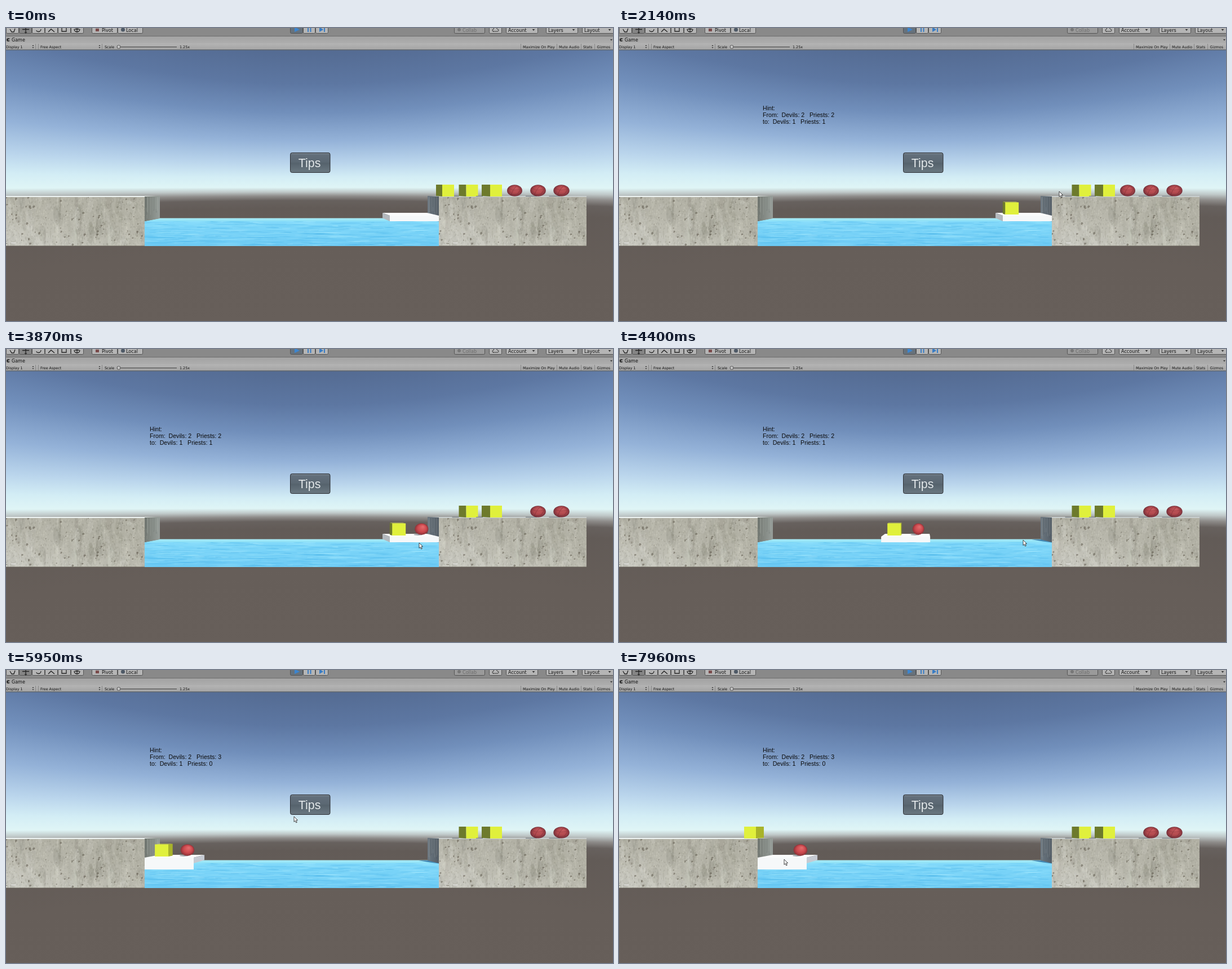
Write an HTML page with a canvas that moves like this. It is 1077 px wide and 520 px high and loops after 8000 ms.

```html
<!DOCTYPE html>
<html lang="en">
<head>
<meta charset="utf-8">
<title>River crossing</title>
<style>
html, body { margin: 0; width: 100%; height: 100%; overflow: hidden; background: #655e5a; }
canvas { display: block; }
</style>
</head>
<body>
<canvas id="stage" width="1077" height="520"></canvas>
<script>
const W = 1077, H = 520, LOOP = 8000;
const STEP = 77.3, PHASE = 37.5;  // the picture is refreshed about 13 times a second
const EYE = { x: 540, y: 280 };   // vanishing point of the scene
const SPEED = 0.83;               // pixels per ms for boat and crew
const ctx = document.getElementById('stage').getContext('2d');

let seed = 7;
const rnd = (a = 0, b = 1) => {
  seed = (seed * 16807) % 2147483647;
  return a + (b - a) * seed / 2147483647;
};
const lerp = (a, b, p) => a + (b - a) * p;
const clamp = p => Math.max(0, Math.min(1, p));

function layer(w, h, paint) {
  const c = document.createElement('canvas');
  c.width = w; c.height = h;
  paint(c.getContext('2d'));
  return c;
}
function gradient(g, x0, y0, x1, y1, stops) {
  const fill = g.createLinearGradient(x0, y0, x1, y1);
  stops.forEach(([p, color]) => fill.addColorStop(p, color));
  return fill;
}
function rect(g, x, y, w, h, color) {
  g.fillStyle = color;
  g.fillRect(x, y, w, h);
}
function poly(g, points, color) {
  g.fillStyle = color;
  g.beginPath();
  points.forEach(p => g.lineTo(...p));
  g.closePath();
  g.fill();
}
function ellipse(g, x, y, rx, ry, color) {
  g.fillStyle = color;
  g.beginPath();
  g.ellipse(x, y, rx, ry, 0, 0, 7);
  g.fill();
}
function text(g, str, x, y, size, color = '#111', font = '"DejaVu Sans", sans-serif') {
  g.font = `${size}px ${font}`;
  g.fillStyle = color;
  g.fillText(str, x, y);
}
const ARIAL = '"Liberation Sans", Arial, sans-serif';

// ---- static scenery -------------------------------------------------

function paintSky(g) {
  const stops = [[-240, '#546b92'], [-180, '#5d77a2'], [-130, '#718fbb'], [-80, '#94b2d8'],
    [-40, '#bad5ec'], [-15, '#d3edf5'], [3, '#dff5f6'], [11, '#bfc8c8'], [18, '#8f8d8b'],
    [26, '#67615e'], [40, '#625b57'], [110, '#665e59'], [240, '#675f5a']];
  const fill = gradient(g, 0, -240, 0, 240, stops.map(([y, c]) => [(y + 240) / 480, c]));
  for (let x = 0; x < W; x++) {
    const stretch = Math.hypot(1, (x - EYE.x) / 520);
    g.setTransform(1, 0, 0, stretch, 0, EYE.y);
    rect(g, x, -260, 1, 520, fill);
  }
  g.resetTransform();
}

const concrete = layer(262, 87, g => {
  rect(g, 0, 0, 262, 87, gradient(g, 60, 0, 40, 87, [[0, '#b2b1a5'], [0.5, '#bcbbb0'], [1, '#c9c9c1']]));
  for (let i = 0; i < 150; i++) {
    const tone = rnd() < 0.55 ? '225,226,216' : '125,124,112';
    ellipse(g, rnd(0, 262), rnd(0, 87), rnd(1, 7), rnd(4, 22), `rgba(${tone},${rnd(0.05, 0.2)})`);
  }
  for (let i = 0; i < 1600; i++) {
    const tone = rnd() < 0.5 ? '235,234,224' : '105,102,90';
    rect(g, rnd(0, 262), rnd(0, 87), rnd(1, 2.5), rnd(1, 4), `rgba(${tone},.13)`);
  }
  for (let i = 0; i < 90; i++) {
    const x = rnd(0, 262), y = rnd(0, 87), r = rnd(0.6, 2);
    ellipse(g, x, y, r, r * rnd(0.8, 1.3), 'rgba(85,80,68,.5)');
    ellipse(g, x + r * 0.7, y + r, r * 0.6, r * 0.5, 'rgba(225,222,208,.5)');
  }
  rect(g, 25, 81, 8, 1, '#eee');
});

function paintBank(g, x, edge, backEdge, sideColors, topColor) {
  poly(g, [[x, 300], [x + 262, 300], [Math.max(x + 262, backEdge), 298], [Math.min(x, backEdge), 298]], topColor);
  poly(g, [[edge, 299], [backEdge, 298], [backEdge, 338], [edge, 343]],
    gradient(g, edge, 0, backEdge, 0, sideColors.map((c, i) => [i, c])));
  for (let i = 0; i < 12; i++) {
    const sx = lerp(edge, backEdge, rnd(0.05, 0.95));
    rect(g, sx, 300, 1, rnd(18, 38), `rgba(${rnd() < 0.5 ? '200,205,200' : '50,55,58'},.18)`);
  }
  g.drawImage(concrete, x, 300);
  rect(g, x, 386, 262, 1, 'rgba(90,85,75,.5)');
}

function paintWater(g) {
  poly(g, [[273, 337.5], [748, 337.5], [768, 343], [246, 343]],
    gradient(g, 0, 337, 0, 343, [[0, '#aeeef6'], [1, '#8be0f8']]));
  g.save();
  g.beginPath();
  g.rect(246, 343, 522, 44);
  g.clip();
  rect(g, 246, 343, 522, 44, gradient(g, 0, 343, 0, 387, [[0, '#82d9fa'], [0.5, '#76d1f7'], [1, '#6ccaf4']]));
  for (let i = 0; i < 480; i++) {
    const tone = rnd() < 0.55 ? '175,238,254' : '60,170,225';
    ellipse(g, rnd(246, 768), rnd(343, 387), rnd(5, 28), rnd(0.4, 1.1), `rgba(${tone},${rnd(0.08, 0.3)})`);
  }
  g.restore();
  poly(g, [[732, 338], [768, 338], [768, 343.5], [752, 341.5]], '#4187b4');
}

function button(g, x, w, label, labelX, color = '#111', fill = '#b5b5b5') {
  g.beginPath();
  g.roundRect(x + 0.5, -6, w - 1, 15.5, 2);
  g.fillStyle = fill;
  g.fill();
  g.strokeStyle = '#555';
  g.lineWidth = 1;
  g.stroke();
  if (label) text(g, label, labelX, 6.5, 8.1, color);
}
function arrows(g, x, y, size, down = true) {
  const s = down ? 1 : -1;
  poly(g, [[x - size, y], [x + size, y], [x, y + s * size * 1.3]], '#333');
}
function paintToolbars(g) {
  rect(g, 0, 0, W, 14, '#898989');
  rect(g, 0, 14, W, 1, '#6f6f6f');
  rect(g, 0, 15, W, 12, gradient(g, 0, 15, 0, 27, [[0, '#a3a3a3'], [1, '#adadad']]));
  rect(g, 0, 27, W, 11, gradient(g, 0, 27, 0, 38, [[0, '#b4b4b4'], [1, '#a5a5a5']]));
  rect(g, 0, 38, W, 1.5, '#646a70');

  for (let i = 0; i < 6; i++) button(g, i * 23, 23, '', 0, '', i === 1 ? '#858585' : '#b5b5b5');
  g.strokeStyle = '#222';
  g.lineWidth = 1.3;
  g.beginPath();
  g.moveTo(7, 2); g.lineTo(10, 7); g.lineTo(14, 7); g.lineTo(16, 1);
  g.moveTo(29, 2.5); g.lineTo(41, 2.5); g.moveTo(35, 0); g.lineTo(35, 8);
  g.moveTo(62, 2); g.arc(57.5, 2, 4.5, 0, 2.6);
  g.moveTo(75, 7); g.lineTo(80, 2); g.lineTo(86, 7);
  g.rect(99, -2, 8, 8);
  g.moveTo(131, 2); g.arc(126, 2, 5, 0, 3.14);
  g.moveTo(126, -1); g.lineTo(126, 7); g.moveTo(122, 2); g.lineTo(130, 2);
  g.stroke();
  arrows(g, 35, 7, 2.5);

  button(g, 152, 46, 'Pivot', 170);
  button(g, 198, 45, 'Local', 213);
  rect(g, 159, 1, 6, 5, '#7a4a4a');
  ellipse(g, 207.5, 3, 3.5, 3.5, '#4e5966');

  button(g, 504, 23, '', 0, '', '#67727c');
  button(g, 527, 22, '', 0);
  button(g, 549, 23, '', 0);
  poly(g, [[512, -2], [521, 3], [512, 7]], '#3c85cf');
  [[535, 2], [539.5, 2], [564, 2]].forEach(([x, w]) => rect(g, x, 0, w, 7, '#397cc4'));
  poly(g, [[556, -2], [563, 3], [556, 7]], '#397cc4');

  button(g, 795, 55, 'Collab', 810, '#6b6b6b', '#9a9a9a');
  ellipse(g, 804, 3, 3, 3, '#777');
  button(g, 857, 23, '', 0);
  g.beginPath();
  g.moveTo(864, 6); g.arc(865, 4, 2, 1.6, 4.8); g.arc(868, 2, 3, 3.4, 6); g.arc(872, 4, 2, 4.7, 7.8);
  g.closePath();
  g.strokeStyle = '#333';
  g.stroke();
  [[887, 57, 'Account', 891], [958, 57, 'Layers', 962], [1022, 60, 'Layout', 1026]].forEach(b => button(g, ...b));
  [936, 1007, 1071].forEach(x => arrows(g, x, 2, 2.3));

  ellipse(g, 4, 21, 3, 3, '#333');
  rect(g, 4, 20, 4, 2, '#aaa');
  text(g, 'Game', 10, 24, 8);
  arrows(g, 1074, 20, 2);
  [[0, 'Display 1'], [61, 'Free Aspect'], [175, 'Scale'], [308, '1.25x'], [917, 'Maximize On Play'],
    [981, 'Mute Audio'], [1024, 'Stats'], [1048.5, 'Gizmos']].forEach(([x, s]) => text(g, s, x, 35.5, 6.4));
  [52, 57, 170, 913, 977, 1020, 1044].forEach(x => rect(g, x, 28, 1, 10, '#888'));
  [48, 166].forEach(x => { arrows(g, x, 32, 1.5, false); arrows(g, x, 34, 1.5); });
  rect(g, 203, 33, 100, 1.3, '#555');
  ellipse(g, 200, 33.5, 3.3, 3.3, '#555');
  ellipse(g, 200, 33.5, 2.4, 2.4, '#c4c4c4');
}

const scenery = layer(W, H, g => {
  paintSky(g);
  paintWater(g);
  paintBank(g, -16, 246, 273, ['#747973', '#979e9a'], '#eef4f3');
  paintBank(g, 768, 768, 748, ['#545e67', '#6c7780'], '#c9cfcf');
  paintToolbars(g);
});

// ---- moving parts ---------------------------------------------------

const recede = (x, y, k) => [lerp(x, EYE.x, k), lerp(y, EYE.y, k)];

function drawBox(x, y, w, h, k, colors) {
  const r = x + w, b = y + h;
  if (y > EYE.y) poly(ctx, [[x, y], [r, y], recede(r, y, k), recede(x, y, k)], colors.top);
  const left = x > EYE.x, edge = left ? x : r;
  if (left || r < EYE.x)
    poly(ctx, [[edge, y], recede(edge, y, k), recede(edge, b, k), [edge, b]], left ? colors.left : colors.right);
  rect(ctx, x, y, w, h, colors.front);
}

const CUBE = { front: '#e0f03c', left: '#6d7a2c', right: '#a8b32a', top: '#dbe85c' };
const BOAT = { front: '#f6f8f9', left: '#b3b8bd', right: '#c6cad2', top: '#fbfcfc' };

// p = 0 on a bank, p = 1 on the boat
function drawCube(x, y, p) {
  drawBox(x, y, lerp(21, 24, p), lerp(21, 21.5, p), lerp(0.047, 0.03, p), CUBE);
}
function drawBall(x, y) {
  const rx = 10.4 + Math.abs(x - EYE.x) * 0.0085, ry = 10.3;
  const onBank = y < 300;
  ctx.save();
  ctx.translate(x, y);
  ctx.scale(rx / ry, 1);
  const fill = ctx.createRadialGradient(2, -4, 1, 0, 0, ry);
  fill.addColorStop(0, onBank ? '#c4585c' : '#e2686a');
  fill.addColorStop(0.6, onBank ? '#ae474c' : '#cb484d');
  fill.addColorStop(1, onBank ? '#73303a' : '#8a3238');
  ellipse(ctx, 0, 0, ry, ry, fill);
  if (onBank) {
    ctx.strokeStyle = 'rgba(80,25,32,.28)';
    ctx.lineWidth = 0.8;
    ctx.beginPath();
    [[-9, -4], [-2, -1], [3, -9], [8, -2], [-2, -1], [-5, 8], [4, 6], [8, -2]].forEach(p => ctx.lineTo(...p));
    ctx.stroke();
  }
  ctx.restore();
}

const boatX = t => lerp(681, 246, clamp((t - 4146) * SPEED / 435));
const cubeSeat = t => 26 + 0.968 * boatX(t);
const ballSeat = t => 87 + 0.955 * boatX(t);

// across first, then down
function board(t, start, x0, y0, x1, y1) {
  const run = Math.max(0, t - start) * SPEED, across = x0 - x1;
  return { x: x0 - Math.min(run, across), y: y0 + Math.max(0, Math.min(run - across, y1 - y0)) };
}

function drawBoat(t) {
  const x = boatX(t), docked = x < 250;
  drawBox(x, 333, 87, 10, 0.092, BOAT);
  if (docked) rect(ctx, x, 333, 87, 21, BOAT.front);
}

function drawCrew(t) {
  [816.5, 859].forEach(x => {
    rect(ctx, x - 25, 298, 12, 1, '#70767a');
    drawCube(x, 278, 0);
  });
  [944, 985.5].forEach(x => {
    rect(ctx, x - 22, 298, 20, 1, '#70767a');
    drawBall(x, 288.5);
  });

  const leave = 7255;
  if (t < leave) {
    const c = board(t, 1970, 774, 278, cubeSeat(0), 309.5);
    drawCube(t > 4000 ? cubeSeat(t) : c.x, c.y, clamp((774 - c.x) / 87));
  } else {
    // up first, then across
    const run = (t - leave) * SPEED, rise = Math.min(run, 31.5);
    const p = clamp((run - rise) / 42);
    drawCube(lerp(264, 222, p), 309.5 - rise, 1 - p);
  }

  const ball = board(t, 2975, 902.5, 288.5, ballSeat(0), 319.5);
  if (t > 4000) ball.x = ballSeat(t);
  if (ball.y > 315) ellipse(ctx, ball.x - 6, 329.5, 8, 1.2, 'rgba(70,75,85,.6)');
  drawBall(ball.x, ball.y);
}

// time, x, y of the pointer tip
const PATH = [
  [77, 700, 441], [386, 611, 299], [464, 611, 299], [930, 562, 247], [1237, 557, 245],
  [1314, 584, 254], [1778, 774, 290], [2100, 774, 290], [2783, 896, 286],
  [2860, 907, 284], [3324, 907, 284], [3700, 775, 358], [3942, 717, 339], [4640, 717, 339],
  [4947, 400, 330], [5102, 308, 319], [5180, 310, 318], [5700, 538, 241], [5875, 535, 245],
  [5952, 511, 260], [6648, 317, 322], [6725, 317, 322], [7112, 286, 318], [7576, 286, 318], [7962, 293, 336]
];
function pointerAt(t) {
  const i = PATH.findIndex(p => p[0] > t + 1);
  if (i === 0) return null;
  if (i < 0) return PATH[PATH.length - 1].slice(1);
  const a = PATH[i - 1], b = PATH[i], p = clamp((t - a[0]) / (b[0] - a[0]));
  const eased = lerp(p, p * p * (3 - 2 * p), 0.5);
  return [lerp(a[1], b[1], eased), lerp(a[2], b[2], eased)];
}
function drawPointer([x, y]) {
  ctx.save();
  ctx.translate(Math.round(x) + 0.5, Math.round(y) + 0.5);
  ctx.lineJoin = 'round';
  poly(ctx, [[-0.5, -0.5], [-0.5, 9], [1.6, 7], [3.2, 10.5], [4.8, 9.8], [3.3, 6.3], [6, 6]], '#fff');
  ctx.strokeStyle = '#1a1a1a';
  ctx.lineWidth = 0.8;
  ctx.stroke();
  ctx.restore();
}

function drawTips(hover) {
  ctx.beginPath();
  ctx.roundRect(504.5, 221.5, 70.5, 35, 3);
  ctx.fillStyle = gradient(ctx, 0, 221, 0, 257, hover
    ? [[0, '#6f7883'], [0.48, '#5d6873'], [0.52, '#58636d'], [1, '#6c7881']]
    : [[0, '#64707c'], [0.48, '#5b6873'], [0.52, '#55626c'], [1, '#6b7982']]);
  ctx.fill();
  ctx.strokeStyle = hover ? '#59616a' : '#2c2e33';
  ctx.lineWidth = 1;
  ctx.stroke();
  rect(ctx, 507, 222.5, 66, 1, 'rgba(190,200,210,.35)');
  text(ctx, 'Tips', 518.8, 247, 21.4, hover ? '#fff' : '#e3e8ea', ARIAL);
}

function drawHint(t) {
  if (t < 1080) return;
  const back = t >= 5870;
  ['Hint:', `From:  Devils: 2   Priests: ${back ? 3 : 2}`, `to:  Devils: 1   Priests: ${back ? 0 : 1}`]
    .forEach((line, i) => text(ctx, line, 255, 146 + i * 12.2, 10.6, '#0a0a0a', ARIAL));
}

function draw(t) {
  ctx.drawImage(scenery, 0, 0);
  drawBoat(t);
  drawCrew(t);
  drawHint(t);
  const tip = pointerAt(t);
  drawTips(tip && tip[0] > 504 && tip[0] < 575 && tip[1] > 222 && tip[1] < 257);
  if (tip) drawPointer(tip);
}

const begin = performance.now();
function tick() {
  const t = (performance.now() - begin) % LOOP;
  draw(Math.floor((t + PHASE) / STEP) * STEP);
  requestAnimationFrame(tick);
}
tick();
</script>
</body>
</html>
```
